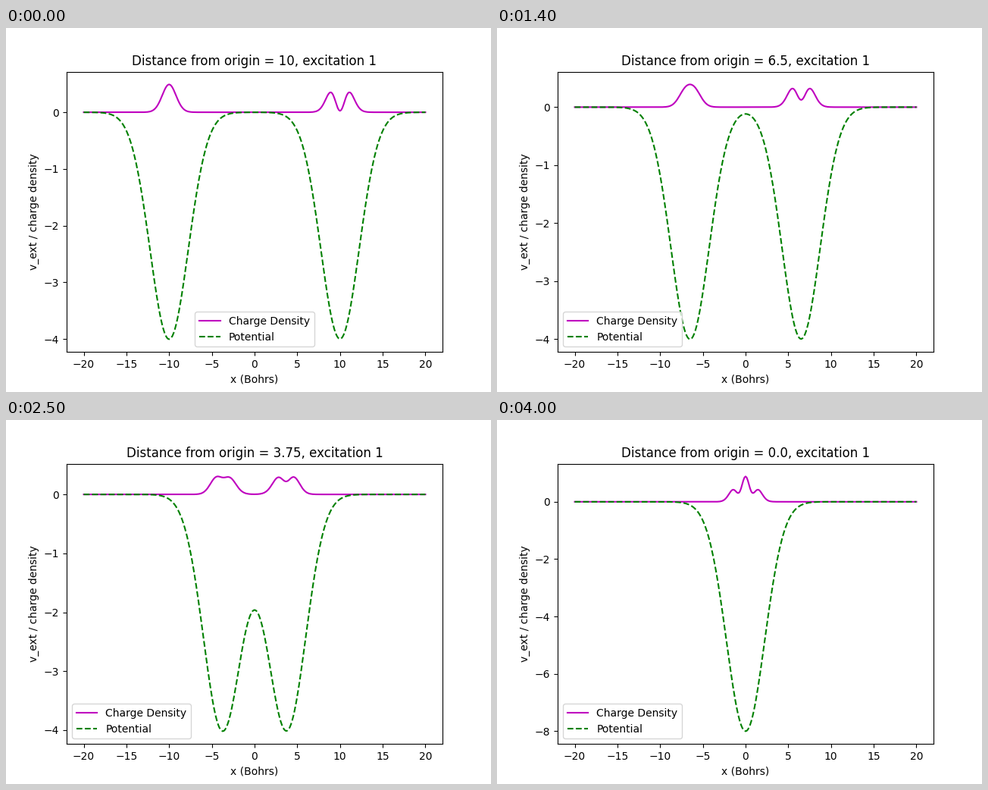
A matplotlib script for the animation above (4100 ms loop, 640 by 480 pixels).

```python
import numpy as np
import matplotlib.pyplot as plt
from matplotlib.animation import FuncAnimation

FRAMES, INTERVAL = 41, 100
POINTS, ORBITALS = 301, 20
LEFT_DEPTH, RIGHT_DEPTH = 4.005, 4.0

x = np.linspace(-20, 20, POINTS)
dx = x[1] - x[0]


def kinetic_matrix():
    """Sinc-grid kinetic energy operator."""
    n = np.arange(POINTS)
    diff = n[:, None] - n
    safe = np.where(diff == 0, 1, diff)
    off = (1.0 - 2.0 * (diff % 2)) / safe**2
    return np.where(diff == 0, np.pi**2 / 6, off) / dx**2


KINETIC = kinetic_matrix()
REPULSION = 1 / (np.abs(x[:, None] - x) + 1)
FIRST, SECOND = np.triu_indices(ORBITALS, 1)


def potential(d):
    return (-LEFT_DEPTH * np.exp(-(x + d)**2 / 10)
            - RIGHT_DEPTH * np.exp(-(x - d)**2 / 10))


def excited_density(v):
    """Density of the first excited state of two like-spin electrons."""
    energy, orb = np.linalg.eigh(KINETIC + np.diag(v))
    energy, orb = energy[:ORBITALS], orb[:, :ORBITALS]

    pairs = (orb[:, :, None] * orb[:, None, :]).reshape(POINTS, -1)
    coulomb = (pairs.T @ REPULSION @ pairs).reshape((ORBITALS,) * 4)
    i, j = FIRST[:, None], SECOND[:, None]
    k, l = FIRST, SECOND
    hamiltonian = coulomb[i, k, j, l] - coulomb[i, l, j, k]
    hamiltonian += np.diag(energy[FIRST] + energy[SECOND])

    state = np.linalg.eigh(hamiltonian)[1][:, 1]
    coeff = np.zeros((ORBITALS, ORBITALS))
    coeff[FIRST, SECOND] = state / np.sqrt(2)
    psi = orb @ (coeff - coeff.T) @ orb.T
    return 2 * (psi**2).sum(axis=1) / dx


distances = [10] + [10 - 0.25 * n for n in range(1, FRAMES)]
potentials = [potential(d) for d in distances]
densities = [excited_density(v) for v in potentials]

fig, ax = plt.subplots(figsize=(6.4, 4.8), dpi=100)


def draw(n):
    ax.clear()
    ax.plot(x, densities[n], "m", label="Charge Density")
    ax.plot(x, potentials[n], "g--", label="Potential")
    ax.set_title(f"Distance from origin = {distances[n]}, excitation 1")
    ax.set_xlabel("x (Bohrs)")
    ax.set_ylabel("v_ext / charge density")
    ax.legend(loc="best")


anim = FuncAnimation(fig, draw, frames=FRAMES, init_func=lambda: None,
                     interval=INTERVAL, repeat=True, repeat_delay=0)
plt.show()
```
